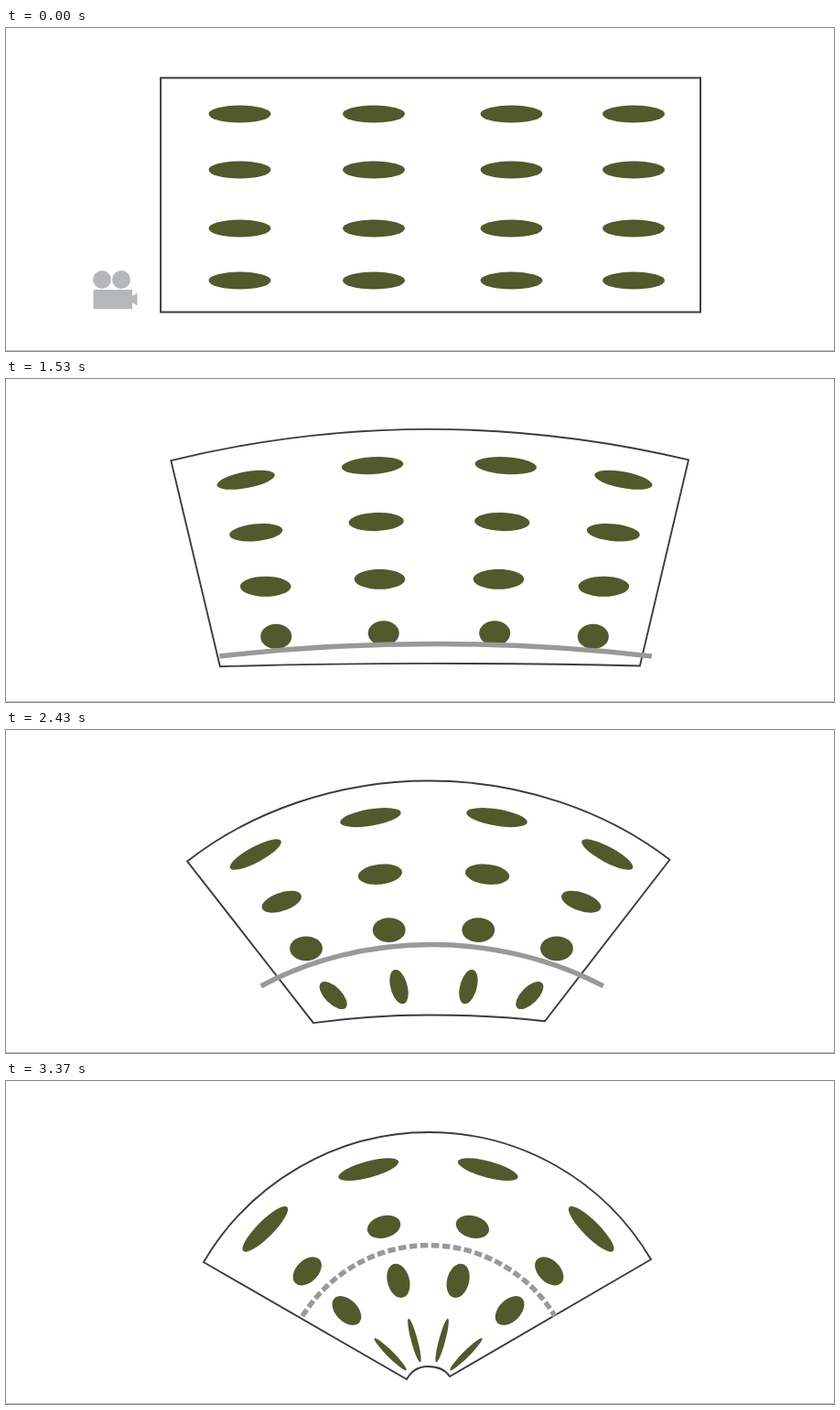
Recreate the animation shown at these times as an HTML page without scripts. Size 905 by 353 pixels, loop 3.96 s.

```html
<!DOCTYPE html>
<html lang="en">
<head>
<meta charset="utf-8">
<title>Sheet bending into a fan</title>
<style>
@property --p { syntax: "<number>"; inherits: true; initial-value: 0; }

html, body { margin: 0; width: 100%; height: 100%; overflow: hidden; background: #fff; }

/* --p is the progress of the bend, shared by all parts */
svg {
  --move: 3.96s steps(29) infinite;
  --cut: 3.96s step-end infinite;
  display: block; width: 100%; height: 100%;
  animation: run var(--move);
}
@keyframes run {
  0%, 22.85% { --p: 0; }
  83.93%, 100% { --p: 1; }
}

.sheet { fill: none; stroke: #3c3c3c; stroke-width: 1.9; animation: bend var(--move); }
@keyframes bend {
  0%, 22.85% { d: path("M169 54.5C266 54.5 364 54.5 462 54.5C561 54.5 660 54.5 759 54.5L759 310.5C660 310.5 561 310.5 462 310.5C364 310.5 266 310.5 169 310.5Z"); }
  83.93%, 100% { d: path("M216 198C267 111 361 56 462 56C563 56 654 109 705 195L485 323C480 315 471 312 461 312C451 312 443 317 438 326Z"); }
}

.line {
  fill: none; stroke: #999; stroke-width: 5.5;
  animation: rise var(--move), look var(--cut);
}
@keyframes rise {
  0%, 22.85% { d: path("M204.5 317.5C292 321.7 377.6 324.4 472 324.5C559 324.4 648 321.7 739.5 317.5"); }
  83.93%, 100% { d: path("M324 257C354 209 406 179.5 462 179.5C518 179.5 571 209 600 257"); }
}
@keyframes look {
  0% { visibility: hidden; stroke-dasharray: none; }
  29% { visibility: visible; stroke-dasharray: none; }
  85.08%, 100% { visibility: visible; stroke-dasharray: 8.5 3.5; }
}

.camera { fill: #b5b7b9; animation: hide var(--cut); }
@keyframes hide { 0% { visibility: visible; } 24.9%, 100% { visibility: hidden; } }

/* Unit circles: a grid of 34 x 9.5 ellipses that moves onto rays from (461.5, 340).
   --t: ray angle, --r: distance, --w and --h: final radii across and along the ray */
.dots { fill: #52592b; }
.dots circle {
  --q: calc(1 - var(--p));
  --x: calc(var(--x0) * var(--q) + (461.5 + var(--r) * sin(var(--t))) * var(--p));
  --y: calc(var(--y0) * var(--q) + (340 - var(--r) * cos(var(--t))) * var(--p));
}
.dots circle:nth-child(1) { --x0: 255.5; --t: -45deg; }
.dots circle:nth-child(2) { --x0: 402; --t: -15deg; }
.dots circle:nth-child(3) { --x0: 552.5; --t: 15deg; }
.dots circle:nth-child(4) { --x0: 686; --t: 45deg; }

.r1 { --y0: 94; --r: 252; --w: 34; --h: 9; }
.r2 { --y0: 155; --r: 187; --w: 18.5; --h: 12; }
.r3 { --y0: 219; --r: 126; --w: 12; --h: 19; --m: .76; }
.r4 { --y0: 276; --r: 58.5; --w: 3.5; --h: 24.7; --m: .28; }

/* Upper rows go straight to the turned ellipse */
.high circle {
  transform: matrix(
    calc(34 * var(--q) + var(--w) * cos(var(--t)) * var(--p)),
    calc(var(--w) * sin(var(--t)) * var(--p)),
    calc(var(--h) * sin(var(--t)) * var(--p) * -1),
    calc(9.5 * var(--q) + var(--h) * cos(var(--t)) * var(--p)),
    var(--x), var(--y));
}

/* Lower rows turn round at --m, then stretch along the ray */
.low circle {
  --u: min(1, var(--p) / var(--m));
  --v: max(0, (var(--p) - var(--m)) / (1 - var(--m)));
  --k: (var(--w) + var(--h)) / 2;
  --e: (var(--w) - var(--h)) / 2;
  --round: 14.3 * (var(--u) - var(--v));
  transform: matrix(
    calc(34 * (1 - var(--u)) + var(--round) + (var(--k) + var(--e) * cos(2 * var(--t))) * var(--v)),
    calc(var(--e) * sin(2 * var(--t)) * var(--v)),
    calc(var(--e) * sin(2 * var(--t)) * var(--v)),
    calc(9.5 * (1 - var(--u)) + var(--round) + (var(--k) - var(--e) * cos(2 * var(--t))) * var(--v)),
    var(--x), var(--y));
}
</style>
</head>
<body>
<svg viewBox="0 0 905 353">
  <g class="camera">
    <circle cx="105" cy="275" r="10"/>
    <circle cx="126" cy="275" r="10"/>
    <path d="M95.5 286H138V293L143.5 289.5V303.5L138 300V307H95.5Z"/>
  </g>
  <path class="sheet"/>
  <g class="dots">
    <g class="r1 high"><circle r="1"/><circle r="1"/><circle r="1"/><circle r="1"/></g>
    <g class="r2 high"><circle r="1"/><circle r="1"/><circle r="1"/><circle r="1"/></g>
    <g class="r3 low"><circle r="1"/><circle r="1"/><circle r="1"/><circle r="1"/></g>
    <g class="r4 low"><circle r="1"/><circle r="1"/><circle r="1"/><circle r="1"/></g>
  </g>
  <path class="line"/>
  <rect y="352" width="905" height="1" fill="#c0c0c0"/>
</svg>
</body>
</html>
```
